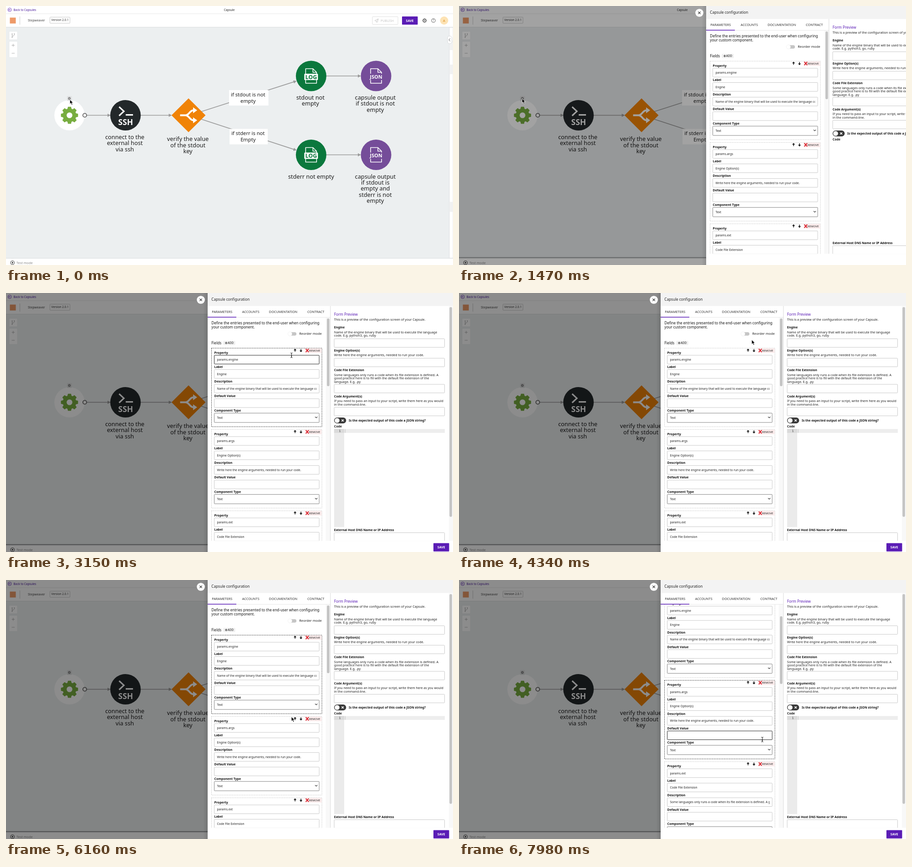
An HTML page that plays this animation: 982x570 px, repeating every 8000 ms.

```html
<!DOCTYPE html>
<html lang="en">
<head>
<meta charset="utf-8">
<title>Capsule editor</title>
<style>
html, body { margin: 0; width: 100%; height: 100%; overflow: hidden; background: #fff; }
svg { display: block; width: 982px; height: 570px; font-family: "Noto Sans", "Open Sans", sans-serif; }
text { white-space: pre; }
</style>
</head>
<body>
<svg id="stage" viewBox="0 0 982 570" xmlns="http://www.w3.org/2000/svg"></svg>
<script>
const LOOP = 8000, STEP = 70;
const PURPLE = '#5a1cb5', EDGE = '#9b9b9b';

// y is the middle of the capital letters
const text = (x, y, s, size = 7.05, fill = '#111', extra = '') =>
  `<text x="${x}" y="${y + size * 0.36}" font-size="${size}" fill="${fill}" ${extra}>${s}</text>`;
const lines = (x, y, pitch, rows, size, fill, extra) =>
  rows.map((s, i) => text(x, y + i * pitch, s, size, fill, extra)).join('');
const rect = (x, y, w, h, fill = 'none', extra = '') =>
  `<rect x="${x}" y="${y}" width="${w}" height="${h}" fill="${fill}" ${extra}/>`;
const circle = (x, y, r, fill = 'none', extra = '') =>
  `<circle cx="${x}" cy="${y}" r="${r}" fill="${fill}" ${extra}/>`;
const path = (d, stroke, width = 1, fill = 'none', extra = '') =>
  `<path d="${d}" fill="${fill}" stroke="${stroke}" stroke-width="${width}" ${extra}/>`;
const MID = 'text-anchor="middle" ', MEDIUM = 'font-weight="500"', BOLD = 'font-weight="600"';

function gear(x, y, r, teeth, color, hole, holeFill) {
  const pts = [];
  const pitch = Math.PI * 2 / teeth;
  for (let i = 0; i < teeth; i++) {
    [[-0.34, 0.78], [-0.2, 1], [0.2, 1], [0.34, 0.78]].forEach(([o, k]) => {
      const a = (i + o) * pitch - Math.PI / 2;
      pts.push((x + Math.cos(a) * r * k).toFixed(2) + ' ' + (y + Math.sin(a) * r * k).toFixed(2));
    });
  }
  return path(`M${pts.join('L')}Z`, color, r * 0.08, color, 'stroke-linejoin="round"') + circle(x, y, hole, holeFill);
}

function arrow(x1, y1, x2, y2) {
  const a = Math.atan2(y2 - y1, x2 - x1);
  return path(`M${x1} ${y1}L${x2 - 3 * Math.cos(a)} ${y2 - 3 * Math.sin(a)}`, EDGE, 1.7) +
    `<path d="M0 0L-7 -3.5V3.5Z" fill="${EDGE}" transform="translate(${x2} ${y2}) rotate(${a * 180 / Math.PI})"/>`;
}

function fileNode(x, y, color, name) {
  const log = name === 'LOG';
  return circle(x, y, 33.5, color) +
    path(`M${x - 12} ${y - 16}h16l8 8v24h-24zM${x + 4} ${y - 16}v8h8`, '#fff', 1.6, 'none', 'stroke-linejoin="round"') +
    rect(x - 15, y - 5, 30, 14, log ? '#fff' : color, 'rx="1.5"') +
    text(x, y + 2, name, log ? 12.5 : 11, log ? color : '#fff', MID + 'font-weight="700"');
}

function header() {
  return rect(0, 0, 982, 47, '#fff') + rect(0, 16.6, 982, 0.8, '#e2e2e2') + rect(0, 46, 982, 1, '#dcdfe0') +
    circle(8, 8.3, 3.9, 'none', `stroke="${PURPLE}" stroke-width=".8"`) +
    path('M10 8.3H6M7.6 6.7L6 8.3L7.6 9.9', PURPLE, 0.8) +
    text(16.5, 8.3, 'Back to Capsules', 6.3, '#4a1a9c', MEDIUM) +
    text(490.5, 8.3, 'Capsule', 6.3, '#222', MID) +
    rect(8.5, 25.5, 13, 13, '#ee9a68') + rect(30, 23, 1, 18, '#ccc') +
    text(48, 31.5, 'Stepweaver', 6.9, '#444') +
    rect(96.5, 24.5, 44, 13.5, '#fff', 'stroke="#bbb" stroke-width=".8" rx="1"') +
    text(118.5, 31.2, 'Version 2.0.1', 6.3, '#333', MID) +
    rect(805, 23.5, 56, 17, '#fff', 'stroke="#d8d8d8" stroke-width=".8" rx="1"') +
    path('M810 32L818 28L816 36L813.5 33.5ZM813.5 33.5L818 28M813.5 33.5V36.5', '#c4c4c4', 0.8) +
    text(823, 32, 'PUBLISH', 7, '#c4c4c4') +
    rect(870, 23, 34.5, 18, PURPLE, 'rx="1"') + text(887, 32, 'SAVE', 7, '#fff', MID + BOLD) +
    gear(919.5, 32, 4.5, 8, '#555', 2.6, '#fff') + circle(919.5, 32, 1.2, '#555') +
    circle(939, 32, 4.1, 'none', 'stroke="#555" stroke-width=".9"') + text(939, 32, '?', 6.5, '#555', MID) +
    circle(962.5, 32, 9, '#fde3b4') + text(962.5, 32, 'A', 7.5, '#d98a1c', MID);
}

function canvasChrome() {
  const button = (y, h) => rect(7, y, 18, h, '#fff', 'stroke="#e0e3e4" stroke-width=".5"');
  return button(56, 18) + button(78, 35) +
    path('M13.5 62V68.5M18.3 62.5V63.5Q18 66 13.5 66.5', '#999', 0.8) +
    circle(13.5, 61.5, 1, '#999') + circle(18.3, 61.5, 1, '#999') + circle(13.5, 69, 1, '#999') +
    path('M12.5 86.5H19M15.75 83.2V89.8M12.5 104H19', '#aaa', 0.9) +
    rect(974, 47, 8, 508, '#fff', 'stroke="#d5d8d9" stroke-width=".7"') +
    rect(974.5, 76, 8, 21, '#f1f1f1') + rect(974.5, 129, 8, 21, '#f1f1f1') + rect(974.5, 431, 8, 22, '#f1f1f1') +
    rect(970, 66, 9.5, 17, '#fff', 'rx="4.5" stroke="#c9cccd" stroke-width=".7"') +
    path('M975.7 71.5L973 74.5L975.7 77.5', '#444', 0.9) +
    rect(0, 555, 982, 15, '#fff') + rect(0, 554.7, 982, 1, '#d8dbdc') +
    circle(14.2, 565, 4.1, 'none', 'stroke="#222" stroke-width=".9"') + path('M13 562.8L16.4 565L13 567.2Z', 'none', 0, '#222') +
    text(23, 565, 'Test mode', 7.3, '#888');
}

function flow() {
  const label = (x, y, rows) => lines(x, y, 13.4, rows, 12.75, '#1c1c1c', MID);
  return arrow(177, 240.5, 230, 240.5) + arrow(296, 240.5, 364.5, 240.5) +
    arrow(424, 234, 638.5, 165) + arrow(424, 247.5, 638.5, 317.5) +
    arrow(703, 154, 780, 154) + arrow(703, 327.5, 780, 327.5) +
    rect(490, 185, 86.5, 34, '#fff') + lines(531.8, 194.5, 14, ['if stdout is not', 'empty'], 11.2, '#1c1c1c', MID) +
    rect(491, 270.5, 84, 34, '#fff') + lines(531.8, 279.8, 14, ['if stderr is not', 'Empty'], 11.2, '#1c1c1c', MID) +
    circle(139.5, 240.5, 33.3, '#fff') + gear(139.5, 240.5, 18.3, 8, '#78ad40', 6.3, '#fff') +
    circle(173, 240.5, 4.1, '#fff', 'stroke="#666" stroke-width="1.8"') +
    circle(262.5, 240.5, 33.5, '#23282a') +
    path('M248.5 222L259 231.7L248.5 241.5M263 239.7H279', '#fff', 3.2) +
    text(262.8, 255.3, 'SSH', 17.4, '#fff', MID + BOLD) +
    path('M401 203.2L438.4 240.5L401 277.8L363.6 240.5Z', 'none', 0, '#f08307') +
    path('M382.5 240.5H394C403 240.5 403 229.5 412 229.5M394 240.5C403 240.5 403 251.5 412 251.5', '#fff', 4) +
    path('M411 223L420 229.5L411 236ZM411 245L420 251.5L411 258Z', 'none', 0, '#fff') +
    fileNode(670.3, 154, '#0b783d', 'LOG') + fileNode(670.3, 327.5, '#0b783d', 'LOG') +
    fileNode(813, 154, '#754d99', 'JSON') + fileNode(813, 327.5, '#754d99', 'JSON') +
    label(261, 288.3, ['connect to the', 'external host', 'via ssh']) +
    label(399.5, 292.7, ['verify the value', 'of the stdout', 'key']) +
    label(668.8, 201.5, ['stdout not', 'empty']) + label(670.3, 375, ['stderr not empty']) +
    label(811.3, 201.5, ['capsule output', 'if stdout is not', 'empty']) +
    label(811.3, 375, ['capsule output', 'if stdout is', 'empty and', 'stderr is not', 'empty']);
}

const CARD_TOP = 121, CARD_PITCH = 179;
const ROWS = [16, 47.5, 79.7, 111.7, 143.3];
const ROW_NAMES = ['Property', 'Label', 'Description', 'Default Value', 'Component Type'];
const ABOUT_ENGINE = 'Name of the engine binary that will be used to execute the language code.';
const ABOUT_ARGS = 'Write here the engine arguments, needed to run your code.';
const ABOUT_EXT = 'Some languages only runs a code when its file extension is defined. A good practice';
const CARDS = [
  ['params.engine', 'Engine', ABOUT_ENGINE, '', 'Text'],
  ['params.args', 'Engine Option(s)', ABOUT_ARGS, '', 'Text'],
  ['params.ext', 'Code File Extension', ABOUT_EXT, '', 'Text'],
];

function card(values, n) {
  const top = CARD_TOP + n * CARD_PITCH;
  const upArrow = dir => `M0 ${3 * dir}V${-2 * dir}M-2.2 ${-0.2 * dir}L0 ${-2.7 * dir}L2.2 ${-0.2 * dir}`;
  const rows = values.map((value, i) => {
    const y = top + ROWS[i], select = i === 4;
    return text(457.5, y - 6, ROW_NAMES[i], 6.95, '#111', BOLD) +
      rect(457.5, y, 230.5, select ? 20.6 : 19.3, '#fff', `id="in${n}${i}" rx="1" stroke-width=".9"`) +
      text(463.5, y + (select ? 10.5 : 9.7), value, 6.6, '#222', 'clip-path="url(#field)"') +
      (select ? path(`M679 ${y + 8}l2.5 2.5l2.5 -2.5`, '#222', 1.1) : '');
  }).join('');
  return rect(451.5, top + 0.3, 242.5, 173, 'none', `id="card${n}" stroke-width=".9" stroke-dasharray="2.2 1.5"`) +
    rect(657, top + 0.8, 36.5, 10, '#fbecec') +
    path(`M658.6 ${top + 1.8}l6.4 7.4M665 ${top + 1.8}l-6.4 7.4`, '#d8202a', 1.9) +
    text(665.8, top + 5.5, 'REMOVE', 6.1, '#222') +
    `<g fill="none" stroke="#111" stroke-width="1.5"><path d="${upArrow(1)}" transform="translate(635 ${top + 5.3})"/>` +
    `<path d="${upArrow(-1)}" transform="translate(648 ${top + 5.3})"/></g>` + rows;
}

function preview() {
  const input = y => rect(721, y, 242.5, 18.8, '#fff', 'stroke="#c4c4c4" stroke-width=".9" rx="1"');
  const name = (y, s, x = 720.8) => text(x, y, s, 6.85, '#111', BOLD);
  const field = (y, title, rows, inputY) => name(y, title) + lines(720.8, y + 10, 7.6, rows, 7.05, '#222') + input(inputY);
  return text(720.8, 47, 'Form Preview', 8.15, PURPLE) +
    text(720.8, 58.3, 'This is a preview of the configuration screen of your Capsule.', 7.05, '#222') +
    field(76, 'Engine', ['Name of the engine binary that will be used to execute the language', 'code. E.g. python3, go, ruby'], 100.7) +
    field(126.8, 'Engine Option(s)', [ABOUT_ARGS], 143.5) +
    field(170, 'Code File Extension', ['Some languages only runs a code when its file extension is defined. A', 'good practice here is to fill with the default file extension of the', 'language. E.g. .py'], 201) +
    field(227.8, 'Code Argument(s)', ['If you need to pass an input to your script, write them here as you would', 'in the command-line.'], 251.5) +
    rect(720.8, 274, 26.5, 13, '#3a3a3a', 'rx="6.5"') + circle(727.4, 280.5, 5.3, '#fff') +
    path('M737.3 278.2l4.6 4.6M741.9 278.2l-4.6 4.6', '#fff', 1.5) +
    name(280.5, 'Is the expected output of this code a JSON string?', 753) + name(294, 'Code') +
    '<g id="editor">' + rect(720.8, 299, 22.2, 216, '#ebebeb') + rect(720.8, 299.4, 22.2, 8.4, '#dadada') +
    rect(743, 299.4, 221, 8.4, '#ededed') + rect(744.8, 299.6, 0.8, 8, '#bbb') +
    text(733.5, 303.6, '1', 6.6, '#333', MID + 'style="font-family:\'Noto Sans Mono\',monospace"') + '</g>' +
    name(521.5, 'External Host DNS Name or IP Address') +
    `<g clip-path="url(#body)">${input(527.5)}</g>`;
}

function panel() {
  const tab = (x, s) => text(x, 41.7, s, 7.25, '#333', MID);
  return rect(433, 0, 10, 570, 'url(#shade)') + rect(443, 0, 539, 570, '#fff') + rect(443, 0, 539, 28.5, '#f3f3f3') +
    circle(428, 15, 8.8, '#fff') + path('M425.3 12.3l5.4 5.4M430.7 12.3l-5.4 5.4', '#222', 1.1) +
    text(451.3, 14.5, 'Capsule configuration', 8.15, '#222') +
    `<g clip-path="url(#body)"><g id="list">` +
    lines(451.3, 66.5, 9, ['Define the entries presented to the end-user when configuring', 'your custom component.'], 8.05, '#111', MEDIUM) +
    rect(621, 86.2, 17, 7.6, '#c5c5c5', 'rx="3.8"') + circle(623.8, 90, 4.6, '#fff', 'stroke="#e4e4e4" stroke-width=".5"') +
    text(644.3, 89.8, 'Reorder mode', 7.3, '#222') + text(451.3, 109.8, 'Fields', 8.15, '#111') +
    rect(477.5, 105.5, 26, 9, '#efefef', 'rx="1"') + path('M481 110h5.4M483.7 107.3v5.4', '#222', 1) +
    text(487, 110, 'ADD', 6.2, '#222') + CARDS.map(card).join('') + '</g>' +
    rect(702.5, 54, 10, 492, '#f8f8f8') + rect(705, 56, 5.6, 149, '#c4c4c4', 'id="thumb" rx="2.8"') + '</g>' +
    tab(474.7, 'PARAMETERS') + tab(537.7, 'ACCOUNTS') + tab(609, 'DOCUMENTATION') + tab(680.7, 'CONTRACT') +
    rect(443, 53.3, 269, 0.7, '#dedede') + rect(443, 52.5, 63, 1.5, PURPLE) +
    rect(712.3, 28.5, 0.9, 517, '#d4d4d4') + preview() +
    rect(973, 28.5, 9, 517, '#f8f8f8') + rect(974.3, 31, 5.6, 482, '#c4c4c4', 'id="thumb2" rx="2.8"') +
    rect(443, 545.5, 539, 24.5, '#fff') + rect(939, 550.5, 34.5, 18.3, PURPLE, 'rx="1"') +
    text(956.3, 559.8, 'SAVE', 7, '#fff', MID + BOLD);
}

document.getElementById('stage').innerHTML = `<defs>
  <clipPath id="body"><rect x="443" y="54" width="539" height="491.5"/></clipPath>
  <clipPath id="field"><rect x="463" y="0" width="219.5" height="800"/></clipPath>
  <linearGradient id="shade"><stop offset="0" stop-opacity="0"/><stop offset="1" stop-opacity=".12"/></linearGradient></defs>` +
  rect(0, 0, 982, 570, '#eceff0') + flow() +
  rect(134.2, 198.3, 10.2, 10.4, '#e0e2e3', 'id="cogBox" rx="1"') + gear(139.2, 203.5, 3, 8, '#777', 1.1, '#e0e2e3') +
  canvasChrome() + header() +
  `<g id="dim">${rect(0, 0, 982, 570, '#000')}${rect(0, 552.8, 982, 1.6, '#000')}</g>` +
  `<g id="panel">${panel()}</g>` +
  path('M0 0V9.7L2.3 7.6L4.1 11.6L5.9 10.8L4.1 7H7.2Z', '#fff', 0.8, '#000', 'id="arrow"') +
  `<g id="beam">${path('M-2.2 -5.2Q0 -5.2 0 -3.6V3.8Q0 5.4 -2.2 5.4M2.2 -5.2Q0 -5.2 0 -3.6M0 3.8Q0 5.4 2.2 5.4M-1.2 2H1.2', '#111', 1)}</g>`;

const el = id => document.getElementById(id);
const show = (id, on) => el(id).setAttribute('display', on ? 'inline' : 'none');
const moveTo = (id, x, y) => el(id).setAttribute('transform', `translate(${x} ${y})`);
const clamp = v => Math.min(1, Math.max(0, v));
const smooth = u => u * u * (3 - 2 * u);

// cubic-bezier(.25, .8, .25, 1)
function drawerEase(x) {
  let lo = 0, hi = 1;
  for (let i = 0; i < 24; i++) {
    const s = (lo + hi) / 2;
    if (0.75 * s * (1 - s) + s ** 3 < x) lo = s; else hi = s;
  }
  return 2.4 * (1 - lo) ** 2 * lo + 3 * (1 - lo) * lo * lo + lo ** 3;
}

// [time, ...values], eased between neighbours
function track(keys, t) {
  let i = keys.findIndex(k => k[0] > t);
  if (i < 0) i = keys.length;
  const a = keys[Math.max(0, i - 1)], b = keys[Math.min(i, keys.length - 1)];
  const u = b[0] > a[0] ? smooth(clamp((t - a[0]) / (b[0] - a[0]))) : 0;
  return a.slice(1).map((v, j) => v + (b[j + 1] - v) * u);
}

const POINTER = [[0, 140.3, 206], [700, 139.5, 205], [770, 139.5, 205], [910, 138.6, 203.8], [2380, 138.6, 203.8],
  [2520, 138, 203.5], [2590, 138, 203.5], [3290, 684, 129.3], [3430, 684, 129.3], [3570, 682, 129.6], [3710, 682, 129.6],
  [4340, 643, 103], [4550, 643.5, 104], [4830, 634, 124], [5110, 648, 108], [5390, 645, 122], [6160, 627, 301],
  [6860, 666.3, 351]];
const SCROLL = [[7140, 0], [7420, 60], [7490, 60], [7630, 79.5]];

function hoverAt(t) {
  const [x, y] = track(POINTER, t);
  const local = y + track(SCROLL, t)[0] - CARD_TOP;
  const inside = t > 2000 && x > 451 && x < 694 && local >= 0;
  const n = inside ? Math.floor(local / CARD_PITCH) : -1;
  const inCard = local - n * CARD_PITCH;
  const row = inside && x > 457 && x < 688 ? ROWS.findIndex(r => inCard >= r && inCard <= r + 19.5) : -1;
  return { n, row };
}

function draw(t) {
  const open = drawerEase(clamp((t - 1340) / 400));
  show('panel', open > 0);
  moveTo('panel', (1 - open) * 539, 0);
  el('dim').setAttribute('opacity', 1);
  el('dim').setAttribute('fill-opacity', 0.45 * open);
  show('editor', t >= 1750);
  el('thumb2').setAttribute('height', t < 2240 ? 482 : 461.5);

  // the dimmed page no longer reacts to the pointer
  const over = open > 0 ? 0 : clamp((t - 980) / 210);
  const shade = 224 - 40 * over;
  el('cogBox').setAttribute('fill', `rgb(${shade},${shade + 1},${shade + 2})`);

  const [scroll] = track(SCROLL, t);
  moveTo('list', 0, -scroll);
  el('thumb').setAttribute('y', 56 + scroll * 0.3);

  const hover = hoverAt(t - STEP);
  CARDS.forEach((_, n) => {
    el('card' + n).setAttribute('stroke', hover.n === n ? '#222' : '#c6c6c6');
    ROWS.forEach((_, i) => el(`in${n}${i}`).setAttribute('stroke',
      hover.n === n && hover.row === i ? '#111' : i === 4 ? '#777' : '#c4c4c4'));
  });

  const [x, y] = track(POINTER, t);
  const typing = hover.row >= 0 && hover.row < 4;
  show('beam', typing);
  show('arrow', !typing);
  moveTo('beam', x, y);
  moveTo('arrow', x, y);
}

const start = performance.now();
function tick(now) {
  const t = Math.max(0, now - start) % LOOP;
  draw(Math.floor(t / STEP) * STEP);
  requestAnimationFrame(tick);
}
draw(0);
requestAnimationFrame(tick);
</script>
</body>
</html>
```
